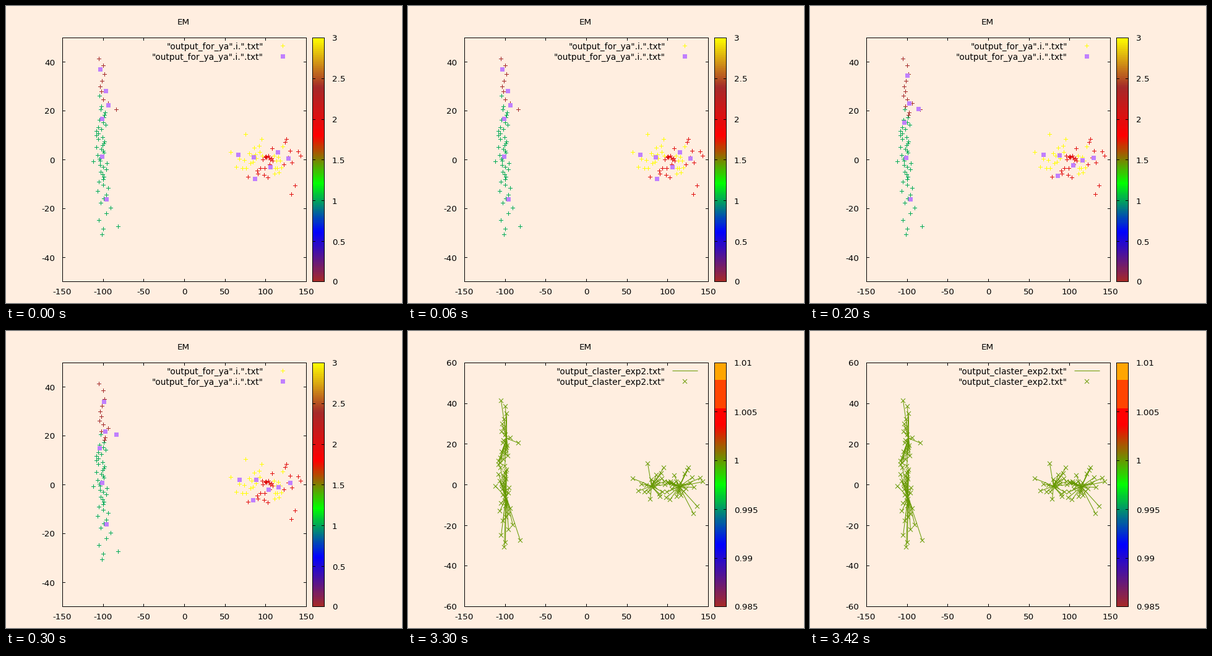
Recreate the animation shown at these times as a matplotlib script. Size 640 by 480 pixels, loop 3.5 s.

```python
import matplotlib.pyplot as plt
import numpy as np
from matplotlib.animation import FuncAnimation
from matplotlib.collections import LineCollection, PolyCollection
from matplotlib.colors import LinearSegmentedColormap

PX = 0.9  # points per pixel at 80 dpi
LEFT, RIGHT, TOP, BOTTOM = 91, 485, 51, 445
MID_X, MID_Y = 288, 248
BAR_LEFT, BAR_RIGHT = 495, 514
BACKGROUND, PURPLE, OLIVE = "#ffeee0", "#c080ff", "#669900"

# Cluster centres drift from START to END; SETTLE is the share covered per step.
START = np.array([(152, 102), (161, 137), (165, 160), (155, 182), (155, 243), (162, 312),
                  (375, 240), (400, 244), (402, 279), (427, 260), (439, 236), (456, 246)])
END = np.array([(158, 114), (160, 162), (178, 167), (151, 189), (155, 245), (162, 312),
                (377, 240), (404, 240), (399, 273), (424, 256), (440, 252), (459, 245)])
SETTLE = (0, 0.65, 0.8, 1)
HUBS = np.array([(159, 173), (158, 268), (393, 250), (438, 251)])
OUTLIERS = [(150, 85), (178, 167), (181, 356), (155, 369), (141, 251),
            (363, 236), (387, 207), (461, 304), (476, 242)]

CLASS_MAP = LinearSegmentedColormap.from_list(
    "classes", ["brown", "blue", "lime", "red", "brown", "yellow"])
FINAL_MAP = LinearSegmentedColormap.from_list(
    "final", ["brown", "blue", "lime", "red", "orange"])


def make_samples():
    """A tall narrow cloud on the left, a wide flat one on the right."""
    rng = np.random.default_rng(7)

    def spread(center, scale, count):
        u = np.linspace(0.05, 0.95, count)
        return center + scale * np.log(u / (1 - u))

    left_y = spread(228, 45, 53)
    left_x = np.clip(rng.normal(157, 6, 53), 146, 170)
    right_x = spread(422, 17, 52)
    right_y = np.clip(rng.normal(250, 18, 52), 215, 294)
    clouds = np.vstack([np.column_stack([left_x, left_y]),
                        np.column_stack([right_x, right_y]), OUTLIERS])
    return np.round(clouds)


SAMPLES = make_samples()

fig = plt.figure(figsize=(8, 6), dpi=80, facecolor=BACKGROUND)
ax = fig.add_axes([0, 0, 1, 1])


def classify(step):
    """Class 0 or 1 for the left cloud, 2 or 3 for the right one."""
    x, y = SAMPLES.T
    lower = y - 3 * (x - 158) > 165 + 4.5 * min(step, 2)
    west = (x < 416) & (x + y < (660 if step < 2 else 656))
    strip = (x > 432) & (x < 449) & (y < (283 if step < 1 else 300))
    return np.where(x < MID_X, lower, 2 + (west | strip))


def strokes(segments, color, zorder=2):
    ax.add_collection(LineCollection(
        segments, colors=[color], linewidths=PX, capstyle="butt",
        snap=False, zorder=zorder), autolim=False)


def pluses(points, color):
    strokes([s for x, y in points for s in
             ([(x - 3.5, y), (x + 3.5, y)], [(x, y - 3.5), (x, y + 3.5)])], color)


def crosses(points, color):
    strokes([s for x, y in points for s in
             ([(x - 3.5, y - 3.5), (x + 3.5, y + 3.5)],
              [(x - 3.5, y + 3.5), (x + 3.5, y - 3.5)])], color)


def squares(points):
    corners = np.array([(-3.5, -3.5), (3.5, -3.5), (3.5, 3.5), (-3.5, 3.5)])
    ax.add_collection(PolyCollection(
        [corners + p for p in points], facecolors=PURPLE, edgecolors="none",
        zorder=3), autolim=False)


def label(x, y, text, ha="center", size=13.5):
    ax.text(x, y + 5, text, ha=ha, va="baseline", fontsize=size * PX,
            family="DejaVu Sans", color="black")


def box(left, right):
    l, r, t, b = left - 0.5, right + 0.5, TOP - 0.5, BOTTOM + 0.5
    strokes([[(l, TOP), (r, TOP)], [(l, BOTTOM), (r, BOTTOM)],
             [(left, t), (left, b)], [(right, t), (right, b)]], "black", 5)


def side_ticks(left, right, y):
    strokes([[(left, y), (left + 4.5, y)], [(right - 4.5, y), (right, y)]],
            "black", 5)


def axes_frame(limit):
    box(LEFT, RIGHT)
    for value in range(-150, 151, 50):
        x = round(MID_X + value * 197 / 150)
        strokes([[(x, TOP), (x, TOP + 4.5)], [(x, BOTTOM - 4.5), (x, BOTTOM)]],
                "black", 5)
        label(x - 0.5, 461, str(value))
    for value in range(-limit // 20 * 20, limit + 1, 20):
        if abs(value) <= limit:
            y = round(MID_Y - value * 197 / limit)
            side_ticks(LEFT, RIGHT, y)
            label(78.5, y, str(value), "right")


def color_bar(colors, names):
    ax.imshow(colors[::-1, None, :], extent=(BAR_LEFT, BAR_RIGHT, BOTTOM, TOP),
              aspect="auto", interpolation="nearest", zorder=1)
    box(BAR_LEFT, BAR_RIGHT)
    for i, name in enumerate(names):
        y = BOTTOM - i * (BOTTOM - TOP) // (len(names) - 1)
        side_ticks(BAR_LEFT, BAR_RIGHT, y)
        label(526.5, y, name, "left")


def legend(first, second):
    for y, text in ((64, first), (81, second)):
        label(415.5, y, text, "right", 13.8)


def draw_clustering(step):
    classes = classify(step)
    for value in range(4):
        pluses(SAMPLES[classes == value], CLASS_MAP(value / 3))
    pluses([(447, 64)], "yellow")
    squares(np.round(START + (END - START) * SETTLE[step]))
    squares([(447, 81)])
    axes_frame(50)
    color_bar(CLASS_MAP(np.linspace(0, 1, 128)),
              [f"{v:g}" for v in np.arange(0, 3.1, 0.5)])
    legend('"output_for_ya".i.".txt"', '"output_for_ya_ya".i.".txt"')


def draw_result():
    points = SAMPLES.copy()
    points[:, 1] = MID_Y + (points[:, 1] - MID_Y) * 5 / 6
    nearest = [min(HUBS, key=lambda hub: np.hypot(*(p - hub))) for p in points]
    strokes(list(zip(nearest, points)), OLIVE)
    crosses(points, OLIVE)
    strokes([[(427, 64), (468, 64)]], OLIVE)
    crosses([(447, 81)], OLIVE)
    axes_frame(60)
    # The top of the bar is three flat bands.
    t = np.linspace(0, 1, 128)
    t = np.select([t < 0.75, t < 0.815, t < 0.933], [t, 0.75, 0.854], 1.0)
    color_bar(FINAL_MAP(t), [f"{v:g}" for v in np.linspace(0.985, 1.01, 6)])
    legend(*['"output_claster_exp2.txt"'] * 2)


def draw(frame):
    ax.clear()
    ax.axis("off")
    label(286.5, 25, "EM")
    if frame < 33:
        draw_clustering(min(frame, 3))
    else:
        draw_result()
    ax.set_xlim(-0.5, 639.5)
    ax.set_ylim(479.5, -0.5)
    return []


animation = FuncAnimation(fig, draw, frames=35, interval=100,
                          init_func=lambda: [], repeat=True, repeat_delay=0)
plt.show()
```
